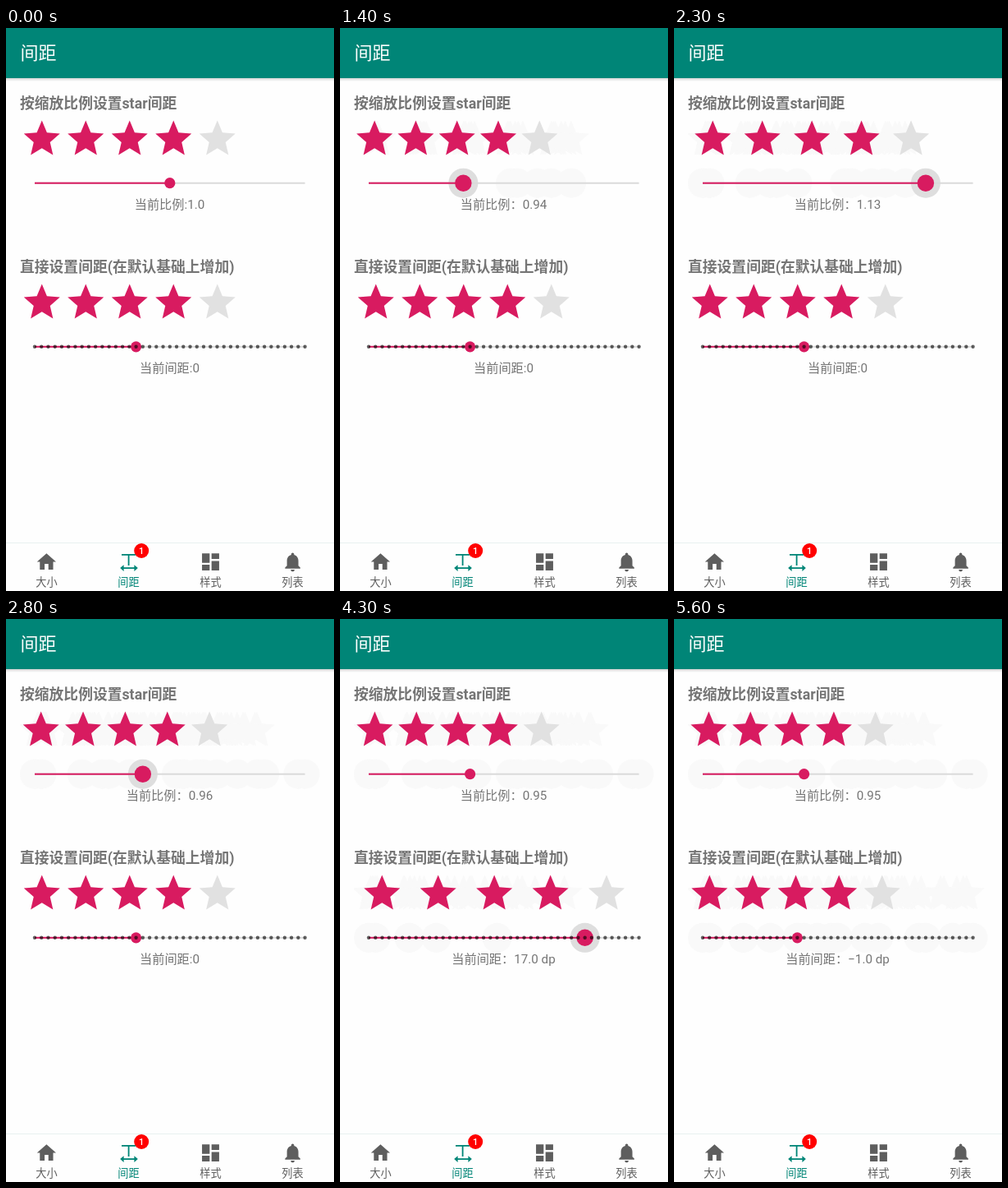
An HTML page with a canvas for the animation above (5700 ms loop, 400 by 685 pixels).

```html
<!DOCTYPE html>
<html lang="zh-CN">
<head>
<meta charset="utf-8">
<title>间距</title>
<style>
  html, body { margin: 0; width: 100%; height: 100%; overflow: hidden; background: #fefefe; }
  canvas { display: block; width: 400px; height: 685px; }
</style>
</head>
<body>
<canvas id="stage"></canvas>
<script>
const W = 400, H = 685, LOOP = 5700, STEP = 100;
const TEAL = '#008577', PINK = '#d81b60', BG = '#fefefe', TRAIL = '#f9f9f9';
const GREY = '#e1e1e1', TRACK = '#dadada', ICON = '#5e5e5e', TEXT = '#757575';
const FONT = 'Roboto, "Noto Sans CJK SC", "Noto Sans CJK", sans-serif';
const LEFT = 17, GAP = 53.5, BAR_X = 35, TICK = 8.24, TICKS = 40;

const canvas = document.getElementById('stage');
const ctx = canvas.getContext('2d');
const dpr = window.devicePixelRatio || 1;
canvas.width = W * dpr;
canvas.height = H * dpr;

// One value per 100 ms while the finger is down, counted in slider ticks.
const sliders = [
  {
    start: 900, zero: 20, starY: 133.5, barY: 188.7, textY: 220,
    moves: [1, 5, 10, 7, 2, -6, -10, -13, -19, -20, -20, -19, -9, 2, 13, 19, 20, 14, 4, -4, -6, -5],
    gap: v => GAP * (1 + v / 100),
    idle: '当前比例:1.0',
    label: v => '当前比例：' + (1 + v / 100).toFixed(2)
  },
  {
    start: 3700, zero: 15, starY: 332.5, barY: 387.8, textY: 419, ticks: true, faint: 2,
    moves: [-5, -9, -14, -15, -9, 4, 17, 22, 25, 24, 18, 11, 9, 5, 2, 0, -1],
    gap: v => GAP + 0.88 * v,
    idle: '当前间距:0',
    label: v => '当前间距：' + v.toFixed(1).replace('-', '−') + ' dp'
  }
];
const RELEASE = [9, 7.5, 6.6];

const icons = {
  star: new Path2D('M12 17.27L18.18 21l-1.64-7.03L22 9.24l-7.19-.61L12 2 9.19 8.63 2 9.24l5.46 4.73L5.82 21z'),
  home: new Path2D('M10 20v-6h4v6h5v-8h3L12 3 2 12h3v8z'),
  board: new Path2D('M3 13h8V3H3v10zm0 8h8v-6H3v6zm10 0h8V11h-8v10zm0-18v6h8V3h-8z'),
  bell: new Path2D('M12 22c1.1 0 2-.9 2-2h-4c0 1.1.89 2 2 2zm6-6v-5c0-3.07-1.64-5.64-4.5-6.32V4c0-.83-.67-1.5-1.5-1.5s-1.5.67-1.5 1.5v.68C7.63 5.36 6 7.92 6 11v5l-2 2v1h16v-1l-2-2z')
};

function rect(x, y, w, h, color) {
  ctx.fillStyle = color;
  ctx.fillRect(x, y, w, h);
}

function circle(x, y, r, color) {
  ctx.fillStyle = color;
  ctx.beginPath();
  ctx.arc(x, y, r, 0, Math.PI * 2);
  ctx.fill();
}

function write(str, x, y, size, color, align = 'center', weight = 400) {
  ctx.font = `${weight} ${size}px ${FONT}`;
  ctx.textAlign = align;
  ctx.fillStyle = color;
  ctx.fillText(str, x, y);
}

// Draws a 24-unit icon around its middle.
function drawIcon(path, cx, cy, scale, color) {
  ctx.save();
  ctx.translate(cx, cy);
  ctx.scale(scale, scale);
  ctx.translate(-12, -12);
  ctx.fillStyle = color;
  ctx.fill(path);
  ctx.restore();
}

function starRow(gap, y, colorAt) {
  for (let i = 0; i < 5; i++) {
    drawIcon(icons.star, LEFT + gap * (i + 0.5), y + 1.1, 2.2, colorAt(i));
  }
}

function drawSlider(s, t) {
  const n = Math.floor((t - s.start) / STEP);
  const count = s.moves.length;
  const touched = n >= 0;
  const pressed = touched && n < count;
  const value = touched ? s.moves[Math.min(n, count - 1)] : 0;
  const xOf = v => BAR_X + (v + s.zero) * TICK;
  const x = xOf(value), y = s.barY;

  ctx.save();
  ctx.beginPath();
  ctx.rect(LEFT, 0, W - 2 * LEFT, H);
  ctx.clip();

  // Faint trail of earlier positions.
  if (touched) {
    starRow(s.gap(0), s.starY, () => TRAIL);
    for (const v of s.moves.slice(0, n + 1)) {
      starRow(s.gap(v), s.starY, () => TRAIL);
      circle(xOf(v), y, 18, TRAIL);
    }
  }
  starRow(s.gap(value), s.starY, i => i < 4 ? PINK : GREY);
  if (pressed && n !== s.faint) circle(x, y, 18, '#dedede');
  ctx.restore();

  rect(BAR_X, y - 1, TICKS * TICK, 2, TRACK);
  rect(BAR_X, y - 1, x - BAR_X, 2, PINK);
  let r = 6.6;
  if (pressed) r = 10.2;
  else if (touched) r = RELEASE[Math.min(n - count, RELEASE.length - 1)];
  circle(x, y, r, PINK);
  if (s.ticks) {
    for (let i = 0; i <= TICKS; i++) circle(BAR_X + i * TICK, y, 2.2, 'rgba(0,0,0,.62)');
  }
  write(touched ? s.label(value) : s.idle, 199.5, s.textY, 15.2, TEXT);
}

function drawSpacingIcon() {
  rect(141, 640, 17, 1.8, TEAL);
  rect(148.7, 640, 1.8, 14, TEAL);
  rect(142, 656.2, 16, 1.8, TEAL);
  for (const side of [-1, 1]) {
    ctx.beginPath();
    ctx.moveTo(150 + side * 10.8, 657.1);
    ctx.lineTo(150 + side * 6.4, 653.3);
    ctx.lineTo(150 + side * 6.4, 660.9);
    ctx.fill();
  }
}

function drawChrome() {
  const shade = ctx.createLinearGradient(0, 61, 0, 65);
  shade.addColorStop(0, 'rgba(0,0,0,.16)');
  shade.addColorStop(1, 'rgba(0,0,0,0)');
  rect(0, 61, W, 4, shade);
  rect(0, 0, W, 61, TEAL);
  write('间距', 17.5, 38.4, 22, '#fff', 'left');
  write('按缩放比例设置star间距', LEFT, 98, 17.8, TEXT, 'left', 700);
  write('直接设置间距(在默认基础上增加)', LEFT, 297, 17.8, TEXT, 'left', 700);

  rect(0, 626, W, 1, '#e8f1f0');
  drawIcon(icons.home, 49.4, 649.6, 1.16, ICON);
  drawSpacingIcon();
  drawIcon(icons.board, 249.5, 649.6, 1.16, ICON);
  drawIcon(icons.bell, 349.6, 649.6, 1.16, ICON);
  ['大小', '间距', '样式', '列表'].forEach((name, i) =>
    write(name, 49.5 + i * 100, 678.5, 13.2, i === 1 ? TEAL : ICON));
  circle(165.2, 636, 9, '#f00');
  write('1', 165.2, 640, 11, '#fff', 'center', 500);
}

function draw(now) {
  const t = now % LOOP;
  ctx.setTransform(dpr, 0, 0, dpr, 0, 0);
  rect(0, 0, W, H, BG);
  sliders.forEach(s => drawSlider(s, t));
  drawChrome();
}

let origin = null;
function tick(now) {
  if (origin === null) origin = now;
  draw(now - origin);
  requestAnimationFrame(tick);
}
draw(0);
requestAnimationFrame(tick);
</script>
</body>
</html>
```
